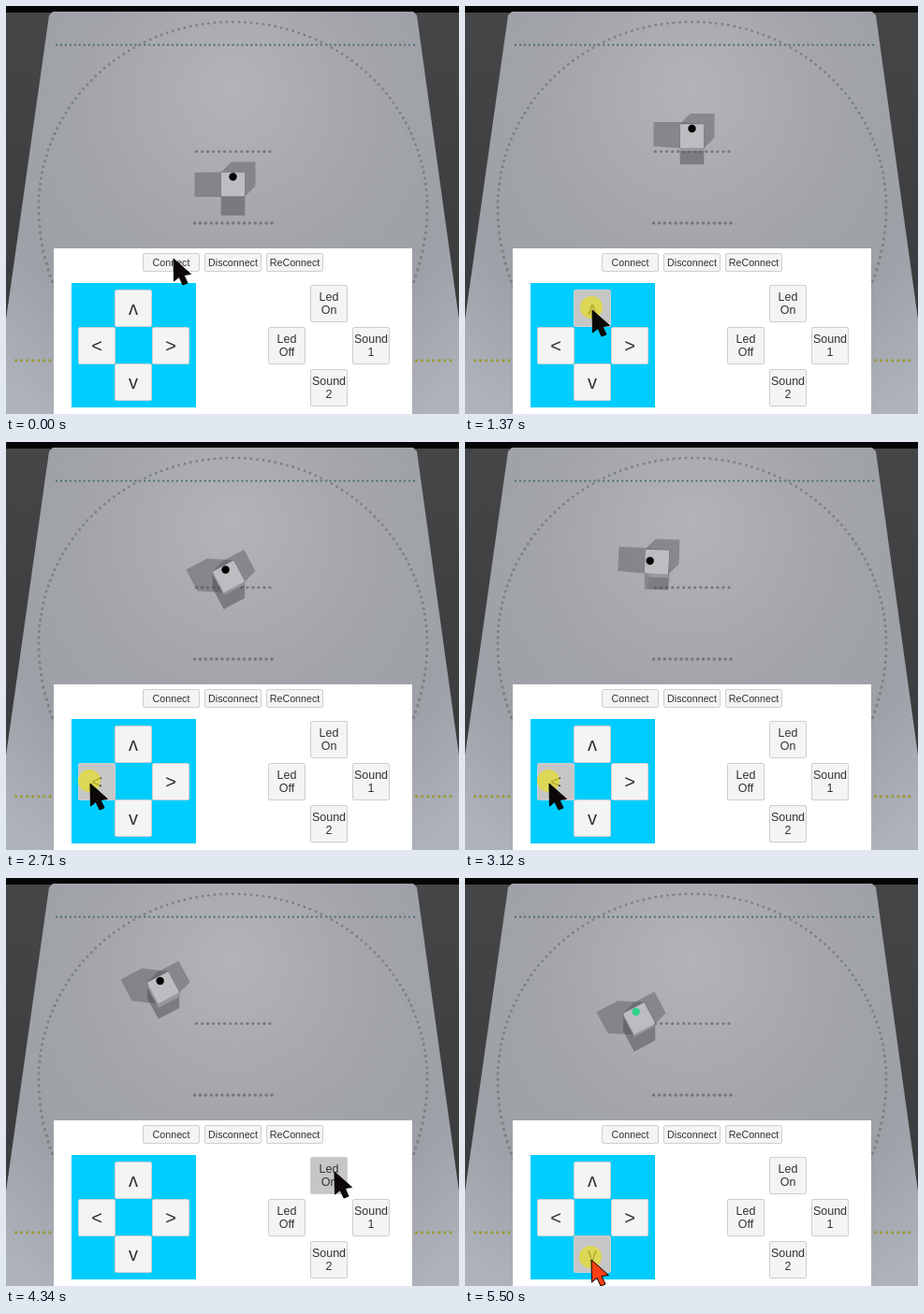
Recreate the animation shown at these times as an HTML page with a canvas. Size 484 by 436 pixels, loop 5560 ms.

```html
<!DOCTYPE html>
<html>
<head>
<meta charset="utf-8">
<style>
html, body { margin: 0; width: 484px; height: 436px; overflow: hidden; background: #000 }
canvas { display: block }
</style>
</head>
<body>
<canvas id="stage" width="484" height="436"></canvas>
<script>
const g = document.getElementById('stage').getContext('2d');
const LOOP = 5560, RAD = Math.PI / 180;

// Where the pointer rests, and the button it holds down
const visits = [
  { from: 0, to: 200, x: 179, y: 270 },
  { from: 560, to: 560, x: 152, y: 390 },
  { from: 840, to: 1450, x: 136, y: 325, key: 'ʌ' },
  { from: 1830, to: 2300, x: 136, y: 403, key: 'v' },
  { from: 2500, to: 3170, x: 90, y: 365, key: '<' },
  { from: 3540, to: 4040, x: 174, y: 364, key: '>' },
  { from: 4240, to: 4380, x: 351, y: 314, key: 'Led On' },
  { from: 5080, to: LOOP, x: 135, y: 408, key: 'v' }
];

const buttons = [];
const addButton = (label, x, y, w, h, size) => buttons.push({ label, x, y, w, h, size });

// Four square buttons around a centre: up, left, right, down
function addCross(cx, cy, step, size, labels) {
  labels.forEach((label, i) => {
    const dx = [0, -step, step, 0][i], dy = [-step, 0, 0, step][i];
    addButton(label, Math.round(cx + dx - 20), Math.round(cy + dy - 20), 40, 40, size);
  });
}

['Connect', 'Disconnect', 'ReConnect'].forEach((s, i) => addButton(s, 146 + 66 * i, 264, 61, 20, 10.7));
addCross(136, 362.5, 39.5, 20, ['ʌ', '<', '>', 'v']);
addCross(345, 362.5, 45, 12.5, ['Led On', 'Led Off', 'Sound 1', 'Sound 2']);

const ramp = (t, a, b) => Math.min(1, Math.max(0, (t - a) / (b - a)));
const mix = (a, b, u) => a + (b - a) * u;

function poly(points, fill) {
  g.beginPath();
  points.forEach(([x, y]) => g.lineTo(x, y));
  g.closePath();
  g.fillStyle = fill;
  g.fill();
}

function disc(x, y, r, fill) {
  g.beginPath();
  g.arc(x, y, r, 0, 7);
  g.fillStyle = fill;
  g.fill();
}

function row(x0, x1, y, n, r, color) {
  for (let i = 0; i < n; i++) disc(mix(x0, x1, i / (n - 1)), y, r, color);
}

function drawFloor() {
  const wall = g.createLinearGradient(0, 0, 0, 330);
  wall.addColorStop(0, '#454647');
  wall.addColorStop(1, '#3a3b3c');
  g.fillStyle = wall;
  g.fillRect(0, 0, 484, 436);
  g.fillStyle = '#060606';
  g.fillRect(0, 0, 484, 7);

  const light = g.createRadialGradient(242, 85, 10, 242, 140, 360);
  light.addColorStop(0, '#b1b3b7');
  light.addColorStop(.4, '#a3a5aa');
  light.addColorStop(.7, '#9da0a6');
  light.addColorStop(1, '#aeb2bb');
  poly([[50, 6], [435, 6], [439, 10], [484, 335], [484, 436], [0, 436], [0, 335], [46, 10]], light);

  row(54, 436, 41.6, 78, 1.1, '#3f6c70');
  for (let i = 0; i < 200; i++) {
    const a = i / 200 * 2 * Math.PI, s = Math.sin(a);
    disc(242.5 + 207.5 * Math.cos(a), 215 + s * (s < 0 ? 198 : 216), 1.6 + s * .2, '#7e8083');
  }
  row(203.5, 282, 155.5, 14, 1.6, '#78797c');
  row(201.5, 284, 232, 15, 1.7, '#757679');
  row(10.5, 47, 378.8, 7, 1.6, '#9a9a34');
  row(438.5, 475, 378.8, 7, 1.6, '#9a9a34');
}

// Drive up, back, turn left, turn right, then reverse; turns are arcs flattened by the view
function cubePose(t) {
  const end = -95 * RAD;
  const left = ramp(t, 2520, 3170) * end;
  const h = left + ramp(t, 3650, 4050) * 67 * RAD;
  const back = ramp(t, 5130, 5500);
  const drive = -58.5 * ramp(t, 860, 1440) + 25.5 * ramp(t, 1940, 2300);
  let x = 242.5 - 39 * (1 - Math.cos(left)) + 18 * back;
  let y = 190.5 + drive + 29.5 * Math.sin(left) + 33 * back;
  if (h > left) {
    x -= 33 * (Math.cos(h) - Math.cos(end));
    y -= 21 * (Math.sin(h) - Math.sin(end));
  }
  return { x, y, h };
}

function drawCube(t) {
  const { x, y, h } = cubePose(t);
  const c = Math.cos(h), s = Math.sin(h);
  const corners = r => [[-r, -r], [r, -r], [r, r], [-r, r]].map(([u, v]) => [x + u * c - v * s, y + u * s + v * c]);
  const sweep = (r, dx, dy, fill) => {
    g.beginPath();
    for (let i = 0; i <= 24; i++) {
      corners(r).forEach(([px, py], j) => g[j ? 'lineTo' : 'moveTo'](px + dx * i / 24, py + dy * i / 24));
      g.closePath();
    }
    g.fillStyle = fill;
    g.fill();
  };
  sweep(13, -28, (y - 180) * .05, 'rgba(75,76,80,.4)');
  sweep(13, 11, -11, 'rgba(75,76,80,.4)');
  sweep(12.8, 0, 16.5 + (y - 120) * .055, 'rgba(65,66,70,.45)');
  sweep(12.4, 0, Math.max(0, (200 - y) * .06), '#97989b');
  poly(corners(12.7), '#bcbdc0');
  disc(x + 7.3 * s, y - 7.3 * c - .7, 4.2, t > 4420 ? '#2fd48c' : '#000');
}

function drawPanel(t) {
  g.fillStyle = '#fff';
  g.fillRect(51, 259, 383, 177);
  g.fillStyle = '#00cdff';
  g.fillRect(70, 296, 133, 133);
  g.textAlign = 'center';
  const held = visits.find(v => t >= v.from && t < v.to);
  for (const { label, x, y, w, h, size } of buttons) {
    const chosen = label === 'Connect' && t > 60 && t < 840;
    g.beginPath();
    g.roundRect(x + .5, y + .5, w - 1, h - 1, 1.5);
    g.fillStyle = held && held.key === label ? '#c6c6c6' : chosen ? '#e9e9e9' : '#f4f4f4';
    g.fill();
    g.strokeStyle = '#cdcfd0';
    g.stroke();
    g.fillStyle = '#323232';
    g.font = size + 'px "Liberation Sans", Arial, sans-serif';
    const lines = label.split(' ');
    lines.forEach((s, i) =>
      g.fillText(s, x + w / 2, y + h / 2 + size * .33 + (i - (lines.length - 1) / 2) * 14));
  }
}

function drawCursor(t) {
  const i = visits.findLastIndex(v => t >= v.from);
  const a = visits[i], b = visits[i + 1] || a;
  const u = a === b ? 0 : ramp(t, a.to, b.from), ease = u * u * (3 - 2 * u);
  const x = mix(a.x, b.x, ease), y = mix(a.y, b.y, ease);
  if (a.key && t < Math.min(a.to, a.from + 700) && !(a.key === 'Led On' && t > a.from + 90))
    disc(x - 1, y - 3, 12, 'rgba(228,222,40,.72)');

  const heat = Math.max(...[720, 5500].map(m => Math.exp(-(((t - m) / 150) ** 2))));
  const shape = [[0, 0], [.5, 24], [6, 19.5], [10, 28], [15, 26], [11, 17.5], [18.5, 16.5]];
  poly(shape.map(([px, py]) => [x + px, y + py]), `rgb(${mix(12, 255, heat)},${mix(8, 62, heat)},${mix(8, 18, heat)})`);
  g.strokeStyle = '#000';
  g.stroke();
}

function frame(now) {
  const t = now % LOOP;
  drawFloor();
  drawCube(t);
  drawPanel(t);
  drawCursor(t);
  requestAnimationFrame(frame);
}
frame(0);
</script>
</body>
</html>
```
